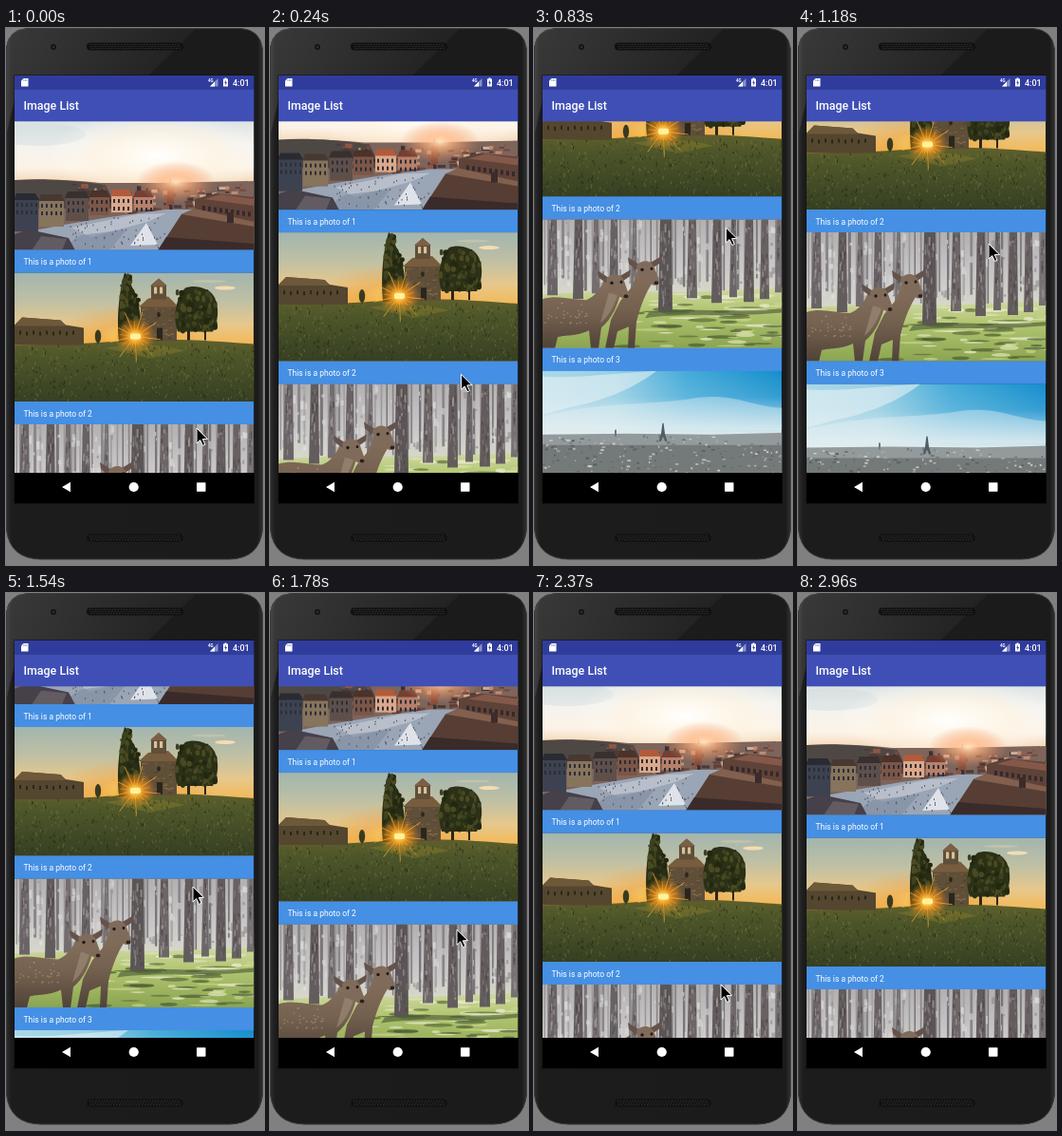
These frames come from a looping animation (272x565 px, 3.32 s). An HTML page:

```html
<!DOCTYPE html>
<html lang="en">
<head>
<meta charset="utf-8">
<title>Image List</title>
<style>
html, body { margin: 0; width: 100%; height: 100%; overflow: hidden; background: #808080; }
svg { display: block; }
text { font-family: Roboto, Arial, sans-serif; fill: #fff; }
</style>
</head>
<body>
<svg id="stage" width="272" height="565" viewBox="0 0 272 565"></svg>
<script>
const LOOP = 3320, ITEM = 159.5, PHOTO_H = 135.5, LIST_W = 252.5;

let seed = 7;
const rnd = (a = 0, b = 1) => {
  seed = (seed * 16807) % 2147483647;
  return a + (b - a) * seed / 2147483647;
};
const pick = list => list[Math.floor(rnd(0, list.length))];
const repeat = (n, make) => Array.from({ length: n }, (_, i) => make(i)).join('');
const rect = (x, y, w, h, fill, more = '') =>
  `<rect x="${x}" y="${y}" width="${w}" height="${h}" fill="${fill}" ${more}/>`;
const path = (d, fill, more = '') => `<path d="${d}" fill="${fill}" ${more}/>`;
const line = (d, color, width, more = '') =>
  `<path d="${d}" fill="none" stroke="${color}" stroke-width="${width}" ${more}/>`;
const oval = (x, y, rx, ry, fill, more = '') =>
  `<ellipse cx="${x}" cy="${y}" rx="${rx}" ry="${ry}" fill="${fill}" ${more}/>`;
const label = (x, y, size, str, more = '') =>
  `<text x="${x}" y="${y}" font-size="${size}" ${more}>${str}</text>`;
const stops = list => list.map(([at, color, alpha = 1]) =>
  `<stop offset="${at}" stop-color="${color}" stop-opacity="${alpha}"/>`).join('');
const linear = (id, list, dir = 'x2="0" y2="1"') =>
  `<linearGradient id="${id}" ${dir}>${stops(list)}</linearGradient>`;
const radial = (id, list) => `<radialGradient id="${id}">${stops(list)}</radialGradient>`;

const defs = '<defs>' +
  linear('dawn', [[0, '#dce3e4'], [.18, '#f4f3ef'], [.36, '#fcf3e6'], [.47, '#f5d9ba']]) +
  radial('glow', [[0, '#fff'], [.25, '#fffaf0', .95], [.6, '#fff4e2', .6], [1, '#fff', 0]]) +
  radial('flare', [[0, '#ffe3bd'], [.3, '#ffb885', .75], [1, '#f08c58', 0]]) +
  linear('dusk', [[0, '#a2b5ae'], [.22, '#bfc0a4'], [.4, '#e6c88c'], [.56, '#f4b854']]) +
  linear('field', [[0, '#5f602c'], [.3, '#4c5529'], [1, '#363f22']]) +
  radial('sun', [[0, '#fffbd0'], [.18, '#ffd34d'], [.45, '#f7941c', .75], [1, '#f08a1c', 0]]) +
  linear('mist', [[0, '#b3b0b1'], [.35, '#c9c7c7'], [.55, '#d6d6ca']]) +
  linear('moss', [[0, '#cfd8a4'], [.35, '#b3c672'], [1, '#8aa450']]) +
  linear('fur', [[0, '#85705d'], [.5, '#75614f'], [1, '#4f4238']]) +
  linear('blue', [[0, '#a9d7e8'], [.3, '#98cfe4'], [.6, '#45abd8'], [1, '#148ecd']], 'x2="1" y2="0"') +
  linear('haze', [[0, '#e8f2f3', 0], [.2, '#e8f2f3', .15], [.49, '#e6eff0', .95], [1, '#e6eff0', 0]]) +
  linear('body', [[0, '#2c2c2c'], [.02, '#1c1c1c'], [.98, '#1b1b1b'], [1, '#303030']], 'x2="1" y2="0"') +
  linear('sheen', [[0, '#fff', .13], [.55, '#fff', .07], [1, '#fff', .02]], 'x2="1" y2=".3"') +
  '</defs>';

function townPhoto() {
  const house = (x, y, w, h, wall, roof) =>
    rect(x, y, w, h, wall) +
    path(`M${x - 1} ${y + 1}l3 -7h${w - 5}l4 7z`, roof) +
    repeat(Math.floor(w / 5) * 2, i =>
      rect(x + 2 + (i >> 1) * 5, y + 4 + (i % 2) * 8, 2, 4, '#2d2e39'));
  return rect(0, 0, LIST_W, 136, 'url(#dawn)') +
    oval(25, 14, 50, 12, '#cbd6da', 'opacity=".4"') +
    oval(150, 36, 115, 46, 'url(#glow)') +
    path('M0 63C30 60 60 62 90 65L150 65 200 64 253 63V136H0z', '#7d655c') +
    path('M0 62C28 60 60 62 96 67L108 92H0z', '#4e4845') +
    repeat(130, () => rect(rnd(60, 253), rnd(66, 95), rnd(2, 9), rnd(1.5, 5),
      pick(['#8e5644', '#4a3a39', '#c08d70', '#75493e', '#372f34', '#d0ab92', '#5f4039']))) +
    path('M0 119L52 109 100 101 160 93 192 93 165 136H0z', '#9aa5b6') +
    path('M60 112L130 98 160 97 140 106 80 122z', '#b9bfca') +
    path('M122 131L139 107 151 130z', '#dfe2e8') +
    path('M46 136L70 120 118 114 100 136z', '#7f8a9e', 'opacity=".6"') +
    house(0, 82, 25, 34, '#3d4250', '#2a2a32') +
    house(26, 83, 26, 28, '#87745c', '#483832') +
    house(54, 80, 24, 25, '#5e4f4a', '#38302f') +
    house(79, 79, 21, 20, '#7c5646', '#4b322a') +
    house(102, 78, 22, 18, '#dba88a', '#b25a3c') +
    house(126, 79, 20, 14, '#b8806a', '#743f34') +
    path('M0 119L15 114 57 123 64 136H0z', '#45404a') +
    path('M18 136L28 121 55 124 50 136z', '#625c62') +
    path('M161 82V69l2 -4 1 -5 2 5 2 4V88h-7z', '#8a4d3c') +
    oval(170, 64, 42, 22, 'url(#flare)') +
    path('M190 82L212 76 253 80V108L190 95z', '#5f4238') +
    path('M200 82L218 77 253 82V89z', '#84594a') +
    repeat(9, i => rect(198 + i * 6, 89 + i * .8, 3, 5, '#33292c')) +
    path('M151 136L176 98 190 92 253 108V136z', '#573e34') +
    path('M176 98L190 92 253 106V111z', '#83604e') +
    path('M151 136L160 122 253 129V136z', '#3a2b2a') +
    rect(224, 96, 7, 11, '#3b2c2b') +
    repeat(60, () => rect(rnd(58, 158), rnd(101, 132), 1, 1.7, '#4f5362'));
}

function chapelPhoto() {
  const ray = i => {
    const a = i * Math.PI / 9 + .12, r = i % 2 ? 16 : 27;
    return line(`M127 67l${Math.cos(a) * r} ${Math.sin(a) * r}`, '#ffb02e', i % 2 ? .6 : .9, 'opacity=".8"');
  };
  const leaves = (n, x0, x1, y0, y1) => repeat(n, () =>
    oval(rnd(x0, x1), rnd(y0, y1), rnd(1, 3), rnd(1.5, 4), pick(['#22280f', '#3c4220', '#2b3116', '#4a4a22'])));
  return rect(0, 0, LIST_W, 136, 'url(#dusk)') +
    oval(222, 16, 11, 2, '#f3dcb4') + oval(205, 9, 18, 1.4, '#d0cab0', 'opacity=".6"') +
    oval(127, 67, 85, 34, 'url(#sun)', 'opacity=".45"') +
    path('M0 76L60 75C100 73 130 70 160 70C200 71 225 73 253 75V136H0z', 'url(#field)') +
    path('M0 55L8 47 48 50 54 55 73 58V76H0z', '#54462f') +
    path('M0 56L8 47 49 50 54 56z', '#6d583a') +
    repeat(9, i => rect(5 + i * 7, 61 + i % 2, 2, 4, '#292719')) +
    oval(88, 67, 3.2, 7, '#373b20') + rect(87.5, 69, 1, 7, '#373b20') +
    path('M133 35L139 29 166 29 171 37V72H133z', '#5f4f38') +
    path('M131 36L141 27 162 25 173 36z', '#785c3e') +
    path('M144 28V13L152 6 160 13V28z', '#5f4e38') +
    path('M143 14L152 6 161 14z', '#7c5f45') +
    rect(147, 15, 3.2, 7, '#d5c298') + rect(153, 15, 3.2, 7, '#d5c298') +
    repeat(45, () => rect(rnd(134, 168), rnd(37, 70), rnd(1, 4), 1, pick(['#4a3d2b', '#7a664a', '#8a7250']))) +
    rect(150, 58, 6, 13, '#2b261d') + oval(152, 44, 1.8, 2.8, '#2b261d') +
    path('M110 73C107 40 112 14 116 0C120 1 123 16 126 18C132 33 136 58 132 73z', '#282e15') +
    leaves(60, 112, 131, 24, 70) + leaves(22, 113, 122, 4, 26) +
    path('M172 62C166 45 171 25 180 16C190 12 206 16 211 26C216 38 215 50 209 62z', '#2b3016') +
    leaves(90, 171, 213, 18, 62) +
    rect(182, 60, 3, 11, '#29281a') + rect(200, 60, 2, 11, '#29281a') +
    oval(127, 67, 22, 20, 'url(#sun)') + repeat(18, ray) +
    rect(122, 64, 11, 6, '#fff0a0', 'rx="2"') +
    path('M95 79C125 74 157 75 180 82L143 90z', '#8f7f2e', 'opacity=".4"') +
    repeat(620, () => {
      const y = rnd(78, 136);
      return line(`M${rnd(0, 253)} ${y}l${rnd(-1.5, 1.5)} ${-rnd(1, 4)}`,
        pick(['#232b17', '#646a33', '#465024', '#77723a', '#2d3619']), 1, 'opacity=".75"');
    });
}

function deerPhoto() {
  const trunk = (x, w, h, color) => path(`M${x} 0h${w}l1 ${h}h${-w - 3}z`, color) +
    repeat(w * 3, () => rect(x + rnd(0, w - 1.5), rnd(0, h - 9), rnd(.6, 2), rnd(3, 9),
      pick(['#a39d9d', '#4c4647', '#857e7f']), 'opacity=".7"'));
  const head = (x, y) =>
    path(`M${x - 7} ${y - 4}l-11 -7 1 7 8 6zM${x + 5} ${y - 5}l12 -7 -1 7 -9 6z`, '#65524a') +
    path(`M${x - 9} ${y - 2}C${x - 4} ${y - 9} ${x + 7} ${y - 9} ${x + 10} ${y}L${x + 15} ${y + 14}Q${x + 13} ${y + 20} ${x + 8} ${y + 18}L${x - 6} ${y + 10}z`, '#806b5a') +
    oval(x - 3, y + 2, 1.7, 1.8, '#201a18') + oval(x + 7, y + 1, 1.4, 1.7, '#201a18') +
    oval(x + 12, y + 16, 2.4, 2, '#2b2220');
  return rect(0, 0, LIST_W, 136, 'url(#mist)') +
    repeat(40, i => rect(i * 6.4 + rnd(-2, 2), 0, rnd(1, 3), rnd(60, 78),
      pick(['#8b8689', '#9b9799', '#787376', '#aaa6a6']))) +
    repeat(150, () => rect(rnd(0, 250), rnd(0, 68), rnd(1, 4), rnd(2, 9),
      pick(['#e6e7e6', '#d8d9d6', '#8f8b8c']), 'opacity=".6"')) +
    path('M0 79L80 75 145 77 253 72V136H0z', 'url(#moss)') +
    repeat(70, () => oval(rnd(85, 252), rnd(78, 134), rnd(4, 20), rnd(.7, 2.3),
      pick(['#5c6d38', '#dfe6b8', '#4b5c34', '#c8d68a', '#eef0d6']), 'opacity=".7"')) +
    trunk(7, 8, 80, '#6a6466') + trunk(34, 8, 84, '#625c5d') + trunk(54, 5, 78, '#736d6f') +
    trunk(72, 7, 80, '#676163') + trunk(95, 4, 76, '#787274') +
    trunk(124, 12, 97, '#5c5556') + trunk(154, 8, 83, '#6c6667') +
    trunk(180, 8, 88, '#635c5d') + trunk(199, 5, 82, '#6d6668') + trunk(214, 8, 87, '#625b5c') +
    trunk(231, 7, 84, '#686162') + trunk(247, 5, 77, '#757071') +
    path('M112 98C150 92 188 99 253 94V98C195 104 145 98 108 104z', '#4f5f38', 'opacity=".65"') +
    path('M66 136L72 106 82 86 95 70 101 52H114L115 68C110 76 104 88 99 108L97 136H90L91 113 79 118 75 136z', 'url(#fur)') +
    head(108, 51) +
    path('M0 84C15 79 31 85 46 85C56 81 61 73 66 62L83 74C80 90 73 105 62 114L59 136H51L49 117C33 124 26 121 16 124L13 136H0z', 'url(#fur)') +
    path('M70 77L79 80C75 93 68 104 61 109z', '#a08e7c', 'opacity=".6"') +
    head(76, 65) +
    repeat(30, () => oval(rnd(2, 48), rnd(88, 110), 1, .8, '#ab9681', 'opacity=".65"'));
}

function cityPhoto() {
  return rect(0, 0, LIST_W, 136, 'url(#blue)') +
    path('M0 6C40 8 80 2 120 0C100 16 70 30 30 38L0 46z', '#edf5f6', 'opacity=".55"') +
    path('M0 48C65 31 116 37 165 28C205 24 221 38 253 39V62H0z', '#e7f1f3', 'opacity=".4"') +
    rect(0, 0, LIST_W, 136, 'url(#haze)') +
    path('M0 67L90 66 180 67 253 65V136H0z', '#939a9c') +
    rect(0, 78, LIST_W, 58, '#747a79') +
    repeat(330, () => rect(rnd(0, 252), rnd(67, 133), rnd(1, 4), rnd(.8, 2.2),
      pick(['#c9cac5', '#59615f', '#a9adab', '#67706b', '#dad8d0', '#4d5953']), 'opacity=".8"')) +
    rect(76, 62, 2, 7, '#71797c') +
    path('M126.4 55h1.2L129 66 131.5 74H129L127 69 125 74H122.5L125 66z', '#525d66');
}

const photos = [townPhoto, chapelPhoto, deerPhoto, cityPhoto];
const listItem = (draw, i) =>
  `<g transform="translate(0 ${i * ITEM})">
    <svg width="${LIST_W}" height="${PHOTO_H}">${draw()}</svg>
    ${rect(0, PHOTO_H, LIST_W, ITEM - PHOTO_H + .3, '#458fe4')}
    ${label(9.5, 151, 8.52, `This is a photo of ${i + 1}`)}
  </g>`;

const speaker = y => rect(85, y, 102, 8, '#111', 'rx="4"') +
  repeat(3, i => line(`M88 ${y + 2 + i * 2}H184`, '#303030', 1, `stroke-dasharray="1.5 1.5" stroke-dashoffset="${i}"`));

const outline = 'M0.5 20Q3 2 22 0.5H248Q268 2 270.5 22V528Q267 558 236 559H36Q4 558 0.5 528z';
const phone = rect(0, 0, 272, 565, '#808080') +
  path(outline, 'url(#body)', 'stroke="#3a3a3a"') +
  path('M1 20Q3 2 22 1H200L150 50H9V75L1 110z', 'url(#sheen)') +
  oval(50, 20, 3, 3, '#141414') + oval(50, 20, 1.2, 1.2, '#333') +
  speaker(15.5) + speaker(532.5) +
  rect(8.5, 49.5, 253.5, 451, '#0c0c0c');

const bars = rect(9, 50, LIST_W, 14.3, '#303c9d') + rect(9, 64.3, LIST_W, 34, '#3f4fb5') +
  path('M18.5 53H23.5V61.5H16V55.5z', '#fff') +
  line('M18.8 54v2M20.3 54v2M21.8 54v2', '#6570b8', .6) +
  label(213, 57, 4.5, '4G', 'font-weight="700"') +
  path('M223.5 53V61.5H215z', '#8790cc') + path('M220 56.5V61.5H215z', '#fff') +
  path('M230.5 52.5h2v1h1.5v8h-5v-8h1.5z', '#fff') +
  path('M231.8 54.5l-1.6 3.3h1.1v2.7l1.7 -3.5h-1.2z', '#303c9d') +
  label(239, 60.8, 9, '4:01', 'font-weight="500"') +
  label(18.5, 86.2, 12.45, 'Image List', 'font-weight="500"');

const navigation = rect(9, 468, LIST_W, 32, '#000') +
  path('M59 483L68 477.8V488.2z', '#fff') + oval(134.7, 483, 5.1, 5.1, '#fff') +
  rect(201, 478.2, 9.5, 9.5, '#fff', 'rx=".6"');

document.getElementById('stage').innerHTML = defs + phone +
  `<svg x="9" y="98" width="${LIST_W}" height="370"><g id="list">${photos.map(listItem).join('')}</g></svg>` +
  bars + navigation +
  `<path id="cursor" d="M0 0V16L3.7 12.6 6.5 18.5 9 17.3 6.3 11.6 11.5 11.3z" fill="#000" stroke="#fff" stroke-width="1"/>`;

const list = document.getElementById('list');
const cursor = document.getElementById('cursor');

// The screen refreshes in uneven steps; the last two follow a pause.
const ticks = Array.from({ length: 23 }, (_, i) =>
  120 * i - 10 * [5, 9, 15, 20].filter(n => i > n).length).concat(2840, 2960);

// Each row: tick, scroll, pointer x, pointer y
const poses = [
  [0, 0, 201, 421], [1, 12, 201, 402], [4, 124, 203, 279], [8, 226, 202, 203],
  [10, 202, 201, 227], [13, 116.5, 197, 309], [17, 32, 197, 388],
  [20, 5, 197, 412], [22, 0, 197, 417], [23, 0, 231, 517]
];

const chord = (i, col) => (poses[i + 1][col] - poses[i][col]) / (poses[i + 1][0] - poses[i][0]);
function slope(i, col) {
  if (i === 0) return chord(0, col);
  if (i === poses.length - 1) return chord(i - 1, col);
  const a = chord(i - 1, col), b = chord(i, col);
  return a * b > 0 ? 2 * a * b / (a + b) : 0;
}
function valueAt(tick, col) {
  let i = 0;
  while (i < poses.length - 2 && poses[i + 1][0] <= tick) i++;
  const [p, q] = [poses[i], poses[i + 1]], span = q[0] - p[0];
  const u = Math.min(1, (tick - p[0]) / span), v = 1 - u;
  return p[col] * (1 + 2 * u) * v * v + q[col] * u * u * (3 - 2 * u) +
    span * u * v * (slope(i, col) * v - slope(i + 1, col) * u);
}

function render(now) {
  const time = now % LOOP;
  const tick = ticks.filter(t => t <= time).length - 1;
  list.setAttribute('transform', `translate(0 ${-valueAt(tick, 1)})`);
  cursor.setAttribute('transform', `translate(${valueAt(tick, 2)} ${valueAt(tick, 3)})`);
  cursor.setAttribute('visibility', tick < 24 ? 'visible' : 'hidden');
}

const start = performance.now();
function loop() {
  render(performance.now() - start);
  requestAnimationFrame(loop);
}
loop();
</script>
</body>
</html>
```
